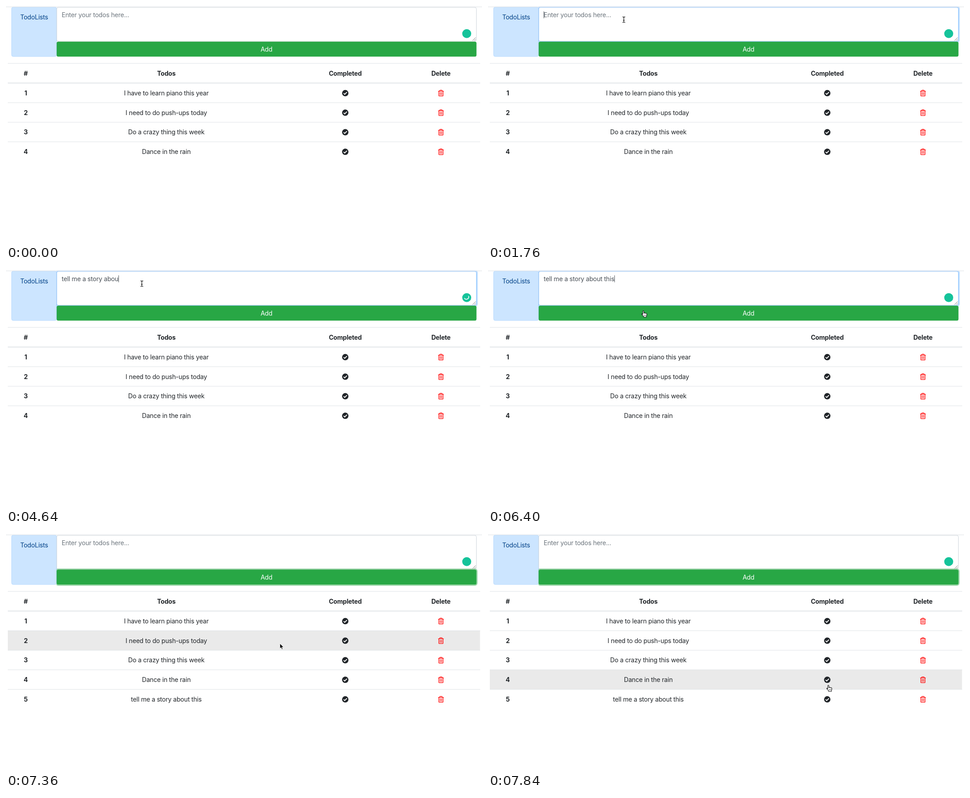
Recreate the animation shown at these times as an HTML page. Size 1060 by 528 pixels, loop 8000 ms.

```html
<!DOCTYPE html>
<html lang="en">
<head>
<meta charset="utf-8">
<title>TodoLists</title>
<style>
  html, body { margin: 0; width: 100%; height: 100%; overflow: hidden; background: #fff; }
  svg { display: block; width: 1060px; height: 528px; }
  text { font: 14px Inter, "Open Sans", sans-serif; letter-spacing: -.19px; fill: #212529; white-space: pre; }
  .mid { text-anchor: middle; }
  .bold, .bold text { font-weight: 700; }
  .line { fill: none; stroke: #dee2e6; }
</style>
</head>
<body>
<svg viewBox="0 0 1060 528">
  <defs>
    <clipPath id="column"><path d="M112.3 0H1060V128H112.3z"/></clipPath>
    <g id="check">
      <circle r="7.1" fill="#212529"/>
      <path d="M-3.7.3-1.2 2.8 3.7-2.2" fill="none" stroke="#fff" stroke-width="1.9"/>
    </g>
    <g id="trash" fill="none" stroke="#f00" stroke-width="1.35">
      <path d="M-6.2-4.3H6.2M-3.4-4.3-2.1-6.5H2.1L3.4-4.3M-4.7-4.3V5.6q0 .9.9.9H3.8q.9 0 .9-.9V-4.3M-1.6-2.2V4.5M1.6-2.2V4.5"/>
    </g>
    <path id="ibeam" d="M-3-6Q-.4-6 0-5 .4-6 3-6M0-5V5.5M-1.6 1.8H1.6M-3 6.5Q-.4 6.5 0 5.5 .4 6.5 3 6.5"/>
  </defs>

  <rect x="12.5" y="2.5" width="100" height="110.5" rx="3.5" fill="#cce5ff" stroke="#b8daff"/>
  <text class="mid" x="62.7" y="30" style="fill:#004085">TodoLists</text>

  <rect x="113" y="3" width="934.5" height="76" rx="3.5" fill="#fff" stroke="#ced4da"/>
  <g id="focus" clip-path="url(#column)">
    <rect x="111.2" y="1.2" width="938" height="79.6" rx="5" fill="none" stroke="#007bff" stroke-opacity=".25" stroke-width="2.7"/>
    <rect x="113" y="3" width="934.5" height="76" rx="3.5" fill="#fff" stroke="#80bdff"/>
  </g>
  <text id="hint" x="124" y="25" style="fill:#6c757d">Enter your todos here...</text>
  <text id="typed" x="124" y="25" style="fill:#495057"></text>
  <rect id="caret" y="12" width="1" height="15.5" fill="#495057"/>
  <path d="M1039 77.5 1046 70.5M1043 77.5 1046 74.5" stroke="#777" fill="none"/>
  <circle cx="1026" cy="61.7" r="10" fill="#15c39a"/>
  <path id="spinner" d="M1021 63.4A5.3 5.3 0 0 0 1030.2 58.5" fill="none" stroke="#fff" stroke-width="1.6" stroke-linecap="round"/>

  <g clip-path="url(#column)">
    <rect id="ring" x="111.6" y="78.6" width="937.3" height="36" rx="5" fill="none" stroke="#48b461" stroke-opacity=".5" stroke-width="2.7"/>
  </g>
  <rect id="button" x="112.8" y="79.7" width="934.9" height="33.6" rx="3.6"/>
  <text class="mid" x="580" y="102" style="fill:#fff">Add</text>
  <path d="M0 0H1060V1.5H0z" fill="#fff"/>
  <path class="line" d="M0 2H1060" stroke-width="1.2"/>

  <rect id="hover" x="4" width="1051.5" height="43.75" fill="#eaeaea"/>
  <path class="line" d="M4 128.3H1056"/>
  <path class="line" d="M4 172.3H1056" stroke-width="1.8"/>
  <g class="bold">
    <text class="mid" x="44" y="155.5">#</text>
    <text class="mid" x="357" y="155.5">Todos</text>
    <text class="mid" x="755.5" y="155.5">Completed</text>
    <text class="mid" x="968.6" y="155.5">Delete</text>
  </g>
  <g id="rows"></g>

  <g id="arrow">
    <path d="M0 0V11.3L2.6 9 4.5 13.2 6.4 12.4 4.6 8.3H8.2z" fill="#000" stroke="#fff" stroke-width=".9"/>
  </g>
  <g id="beam" fill="none">
    <use href="#ibeam" stroke="#fff" stroke-width="2.4"/>
    <use href="#ibeam" stroke="#111" stroke-width="1.2"/>
  </g>
  <g id="hand" stroke="#111" stroke-linejoin="round">
    <g transform="translate(-.8 -.3) scale(1.08)">
      <path d="M3.2 8V1.7q0-1.2 1.1-1.2t1.1 1.2V5.6q.2-.8 1.1-.8t1 .9q.2-.6 1-.6t1 1q.2-.5.9-.5 1.1 0 1.1 1.3V9q0 1.6-.8 2.6V13.5H5V12.2Q3.3 10.6 1.8 8.6.6 7.2 1.2 6.7t2 1.3z" fill="#fff"/>
      <path d="M6 8.5V11.3M7.8 8.5V11.3M9.6 8.5V11.3" stroke-width=".6"/>
    </g>
  </g>
</svg>
<script>
const LOOP = 8000, STEP = 160, TYPE_START = 2080;
const $ = id => document.getElementById(id);
const show = (id, on) => $(id).setAttribute('visibility', on ? 'visible' : 'hidden');
const phrase = 'tell me a story about this';
const counts = [1, 2, 3, 4, 5, 6, 7, 8, 9, 10, 11, 12, 13, 15, 17, 18, 20, 21, 22, 24, 25, 26];

// [start ms, cursor shape, x, y]
const moves = [
  [0, '', 0, 0],
  [160, 'arrow', 1041, 265],
  [320, 'beam', 430, 45],
  [480, 'beam', 150, 34],
  [640, 'arrow', 49, 26],
  [800, 'beam', 210, 32],
  [960, 'beam', 302.5, 30.3],
  [5920, 'beam', 310, 50],
  [6080, 'arrow', 330, 317],
  [6240, 'arrow', 338, 150],
  [6400, 'hand', 342, 91],
  [6560, 'hand', 343, 93.5],
  [6720, 'hand', 343, 94.5],
  [7040, 'hand', 350, 98],
  [7200, 'arrow', 430, 158],
  [7360, 'arrow', 610, 245],
  [7520, 'arrow', 746, 303],
  [7680, 'arrow', 752, 322],
  [7840, 'hand', 754, 338]
];
const paints = [[0, '#28a745'], [6560, '#218838'], [6720, '#1e7e34'], [6880, '#218838'], [7200, '#28a745']];
const hovers = [[0, -1], [7360, 1], [7520, 2], [7680, 3]];
const glows = [[0, 0], [1440, .5], [1600, 1], [6720, 0]];
const at = (list, t) => list.findLast(item => item[0] <= t);

const rowTop = i => 172.9 + 43.75 * i;
const todos = ['I have to learn piano this year', 'I need to do push-ups today', 'Do a crazy thing this week', 'Dance in the rain', phrase];
$('rows').innerHTML = todos.map((todo, i) => {
  const y = rowTop(i) + 22;
  return `<g id="row${i}">
    ${i ? `<path class="line" d="M4 ${rowTop(i) - .3}H1056"/>` : ''}
    <text class="mid bold" x="44" y="${y + 5}">${i + 1}</text>
    <text class="mid" x="357" y="${y + 5}">${todo}</text>
    <use href="#check" x="755.5" y="${y}"/>
    <use href="#trash" x="968.6" y="${y}"/>
  </g>`;
}).join('');

function draw(now) {
  const t = Math.floor(now % LOOP / STEP) * STEP;

  const added = t >= 6880;
  const key = Math.min((t - TYPE_START) / STEP, counts.length - 1);
  const text = added || key < 0 ? '' : phrase.slice(0, counts[key]);
  const typed = $('typed');
  if (typed.textContent !== text) typed.textContent = text;
  show('hint', !text);
  show('caret', t >= 1600 && t < 6720);
  $('caret').setAttribute('x', 124 + (text ? typed.getComputedTextLength() : 0));
  $('focus').setAttribute('opacity', at(glows, t)[1]);

  show('spinner', t >= 3680 && t < 5760);
  $('spinner').setAttribute('transform', `rotate(${(t - 4640) * .45} 1026 61.7)`);

  $('button').setAttribute('fill', at(paints, t)[1]);
  show('ring', t >= 6720);
  show('row4', added);

  const row = at(hovers, t)[1];
  show('hover', row >= 0);
  $('hover').setAttribute('y', rowTop(row) - .3);

  const [, shape, x, y] = at(moves, t);
  for (const id of ['arrow', 'beam', 'hand']) {
    show(id, id === shape);
    $(id).setAttribute('transform', `translate(${x} ${y})`);
  }
}

const start = performance.now();
function tick() {
  draw(performance.now() - start);
  requestAnimationFrame(tick);
}
tick();
</script>
</body>
</html>
```
